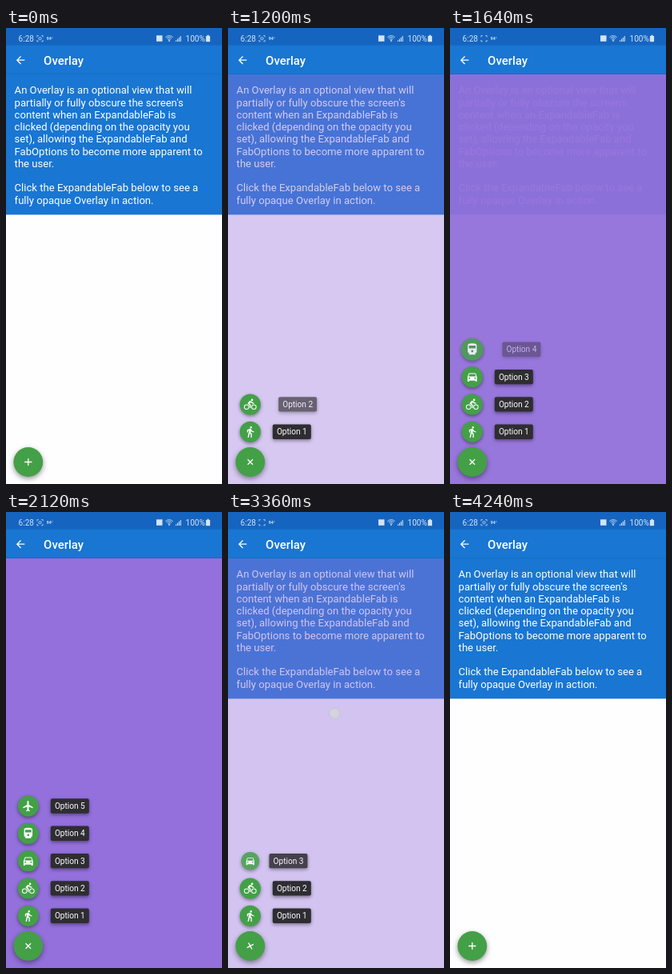
An HTML page with a canvas for the animation above (4280 ms loop, 270 by 570 pixels).

```html
<!DOCTYPE html>
<html lang="en">
<head>
<meta charset="utf-8">
<title>Overlay</title>
<style>
  html, body { margin: 0; width: 100%; height: 100%; overflow: hidden; background: #fefdff; }
  canvas { display: block; width: 270px; height: 570px; }
</style>
</head>
<body>
<canvas id="stage"></canvas>
<script>
const W = 270, H = 570, LOOP = 4280, STEP = 40;
const OPEN = 785, CLOSE = 3080;
const DP = 0.656;
const GREEN = '#43a047', PURPLE = '#9370db', BLUE = '#1976d2';
const FONT = 'Roboto, Arial, sans-serif';
const FAB = { x: 27.8, y: 542.5 };
const ratio = window.devicePixelRatio || 1;

function surface(canvas) {
  canvas.width = W * ratio;
  canvas.height = H * ratio;
  const ctx = canvas.getContext('2d');
  ctx.scale(ratio, ratio);
  return ctx;
}

const stage = surface(document.getElementById('stage'));
const layer = surface(document.createElement('canvas'));
let c = stage;

const copy = [
  'An Overlay is an optional view that will',
  "partially or fully obscure the screen's",
  'content when an ExpandableFab is',
  'clicked (depending on the opacity you',
  'set), allowing the ExpandableFab and',
  'FabOptions to become more apparent to',
  'the user.',
  '',
  'Click the ExpandableFab below to see a',
  'fully opaque Overlay in action.'
];

const wheel = x => `M${x - 5} 17a5 5 0 1 0 10 0a5 5 0 1 0-10 0zm1.5 0a3.5 3.5 0 1 1 7 0a3.5 3.5 0 1 1-7 0z`;
const dot = (x, y, r) => `M${x - r} ${y}a${r} ${r} 0 1 0 ${2 * r} 0a${r} ${r} 0 1 0 ${-2 * r} 0z`;
const icon = d => new Path2D(d);

const back = icon('M20 11H7.83l5.59-5.59L12 4l-8 8 8 8 1.41-1.41L7.83 13H20z');
const plus = icon('M19 13h-6v6h-2v-6H5v-2h6V5h2v6h6z');
const options = [
  icon(dot(13.5, 3.5, 2) + 'M9.8 8.9L7 23h2.1l1.8-8 2.1 2v6h2v-7.5l-2.1-2 .6-3C14.8 12 16.8 13 19 13v-2c-1.9 0-3.5-1-4.3-2.4l-1-1.6c-.4-.6-1-1-1.7-1-.3 0-.5.1-.8.1L6 8.3V13h2V9.6z'),
  icon(dot(15.5, 3.5, 2) + wheel(5) + wheel(19) + 'M10.8 10.5l2.4-2.4.8.8c1.3 1.3 3 2.1 5.1 2.1V9c-1.5 0-2.7-.6-3.6-1.5l-1.9-1.9c-.9-.8-2.3-.8-3 0L7.8 8.4c-.8.8-.8 2.1 0 2.8L11 14v5h2v-6.2z'),
  icon('M18.92 6C18.72 5.4 18.16 5 17.5 5h-11c-.66 0-1.2.4-1.42 1L3 12v8q0 1 1 1h1q1 0 1-1v-1h12v1q0 1 1 1h1q1 0 1-1v-8zM5 11l1.5-4.5h11L19 11z' + dot(6.5, 14.5, 1.5) + dot(17.5, 14.5, 1.5)),
  icon('M4 15.5C4 17.4 5.6 19 7.5 19L6 20.5v.5h12v-.5L16.5 19c1.9 0 3.5-1.6 3.5-3.5V5c0-3.5-3.6-4-8-4s-8 .5-8 4zM18 10H6V5h12z' + dot(12, 15, 2)),
  icon('M21 16v-2l-8-5V3.5a1.5 1.5 0 0 0-3 0V9l-8 5v2l8-2.5V19l-2 1.5V22l3.5-1 3.5 1v-1.5L13 19v-5.5z')
];

const clamp = v => Math.max(0, Math.min(1, v));
const part = (t, start, length) => clamp((t - start) / length);
const ease = p => (1 - Math.cos(Math.PI * p)) / 2;
const overshoot = p => (p - 1) ** 2 * (4.5 * (p - 1) + 3.5) + 1;

function rect(x, y, w, h, fill) {
  c.fillStyle = fill;
  c.fillRect(x, y, w, h);
}

function circle(x, y, r, fill) {
  c.fillStyle = fill;
  c.beginPath();
  c.arc(x, y, r, 0, 7);
  c.fill();
}

function text(s, x, y, size, fill = '#fff', weight = 400) {
  c.font = `${weight} ${size}px ${FONT}`;
  c.fillStyle = fill;
  c.fillText(s, x, y);
}

function shape(path, x, y, scale = 1, turn = 0) {
  c.save();
  c.translate(x, y);
  c.rotate(turn * Math.PI / 180);
  c.scale(DP * scale, DP * scale);
  c.translate(-12, -12);
  c.fillStyle = '#fff';
  c.fill(path, 'evenodd');
  c.restore();
}

function raised(blur, dy, draw) {
  c.save();
  c.shadowColor = 'rgba(0,0,0,.42)';
  c.shadowBlur = blur * ratio;
  c.shadowOffsetY = dy * ratio;
  draw();
  c.restore();
}

// Fades a whole group at once, so that its parts do not show through each other.
function faded(alpha, draw) {
  if (alpha <= 0) return;
  if (alpha >= 1) return draw();
  layer.clearRect(0, 0, W, H);
  c = layer;
  draw();
  c = stage;
  c.globalAlpha = alpha;
  c.drawImage(layer.canvas, 0, 0, W, H);
  c.globalAlpha = 1;
}

function statusBar(t) {
  const ink = '#d3e3f5';
  rect(0, 0, W, 21.5, '#1565c0');
  text('6:28', 15.6, 17.1, 10, ink);
  text('94°', 50.8, 15, 5.2, ink, 700);

  // capture marker, its middle blinks once a second
  c.strokeStyle = ink;
  c.lineWidth = 0.8;
  c.beginPath();
  for (const sx of [-1, 1]) for (const sy of [-1, 1]) {
    c.moveTo(42.5 + sx * 1.8, 13.2 + sy * 3.6);
    c.lineTo(42.5 + sx * 3.6, 13.2 + sy * 3.6);
    c.lineTo(42.5 + sx * 3.6, 13.2 + sy * 1.8);
  }
  c.stroke();
  if ((t + 200) % 1000 < 500) {
    c.beginPath();
    c.arc(42.5, 13.2, 1.6, 0, 7);
    c.stroke();
  }

  rect(188, 9.3, 7.5, 7.5, ink);

  c.lineWidth = 0.9;
  for (const r of [2.4, 4.5, 6.6]) {
    c.beginPath();
    c.arc(204, 16.3, r, -2.35, -0.79);
    c.stroke();
  }
  circle(204, 16, 0.9, ink);
  for (let i = 0; i < 4; i++) rect(212 + i * 1.9, 15.5 - i * 1.8, 1.1, 1.5 + i * 1.8, ink);

  text('100%', 224.5, 17.1, 10.1, ink);
  rect(249.9, 10, 5.2, 7.2, ink);
  rect(251.4, 8.8, 2.2, 1.4, ink);
}

function option(t, i) {
  const opened = OPEN + i * 250;
  const pop = part(t, opened, 125);
  const slide = part(t, opened, 250);
  const gone = ease(part(t, CLOSE + (4 - i) * 125, 125));
  const y = 504.8 - i * 34.3;
  const size = Math.max(0, overshoot(pop) * (1 - gone));

  faded(pop * (1 - gone), () => {
    raised(4, 1.8, () => circle(FAB.x, y, 13.1 * size, GREEN));
    shape(options[i], FAB.x, y, size);
  });

  const x = 55.8 + 32 * (overshoot(slide) - 1 - gone);
  faded(slide * (1 - gone), () => {
    raised(4, 1.8, () => {
      c.fillStyle = '#2e2d31';
      c.beginPath();
      c.roundRect(x, y - 9.3, 48, 18.4, 2);
      c.fill();
    });
    text('Option ' + (i + 1), x + 5.1, y + 3.5, 10.1);
  });
}

function touch(x, y, from, to, t) {
  faded(Math.min(part(t, from, 60), 1 - part(t, to, 70)) * 0.8, () => {
    circle(x, y, 7.4, 'rgba(200,203,204,.7)');
    circle(x, y, 5.8, '#d6d8d9');
  });
}

function draw(t) {
  rect(0, 0, W, H, '#fefdff');
  rect(0, 0, W, 233.4, BLUE);
  copy.forEach((line, i) => text(line, 10.6, 82.3 + i * 15.25, 13.1));

  faded(ease(part(t, OPEN, 1000)) * (1 - ease(part(t, CLOSE, 500))),
    () => rect(0, 58, W, H - 58, PURPLE));

  rect(0, 21, W, 37, BLUE);
  rect(0, 57, W, 1, 'rgba(0,0,0,.08)');
  statusBar(t);
  shape(back, 18.1, 40.2);
  text('Overlay', 47.1, 45.6, 14.9, '#fff', 500);

  for (let i = 4; i >= 0; i--) option(t, i);

  raised(6, 2.4, () => circle(FAB.x, FAB.y, 18.4, GREEN));
  const turn = ease(part(t, OPEN, 250)) - ease(part(t, CLOSE, 400));
  shape(plus, FAB.x, FAB.y, 1, -135 * turn);

  touch(30, 543.7, 640, 790, t);
  touch(133.2, 251.7, 2960, 3365, t);
}

function frame(now) {
  draw(Math.floor(now % LOOP / STEP) * STEP);
  requestAnimationFrame(frame);
}
draw(0);
requestAnimationFrame(frame);
</script>
</body>
</html>
```
